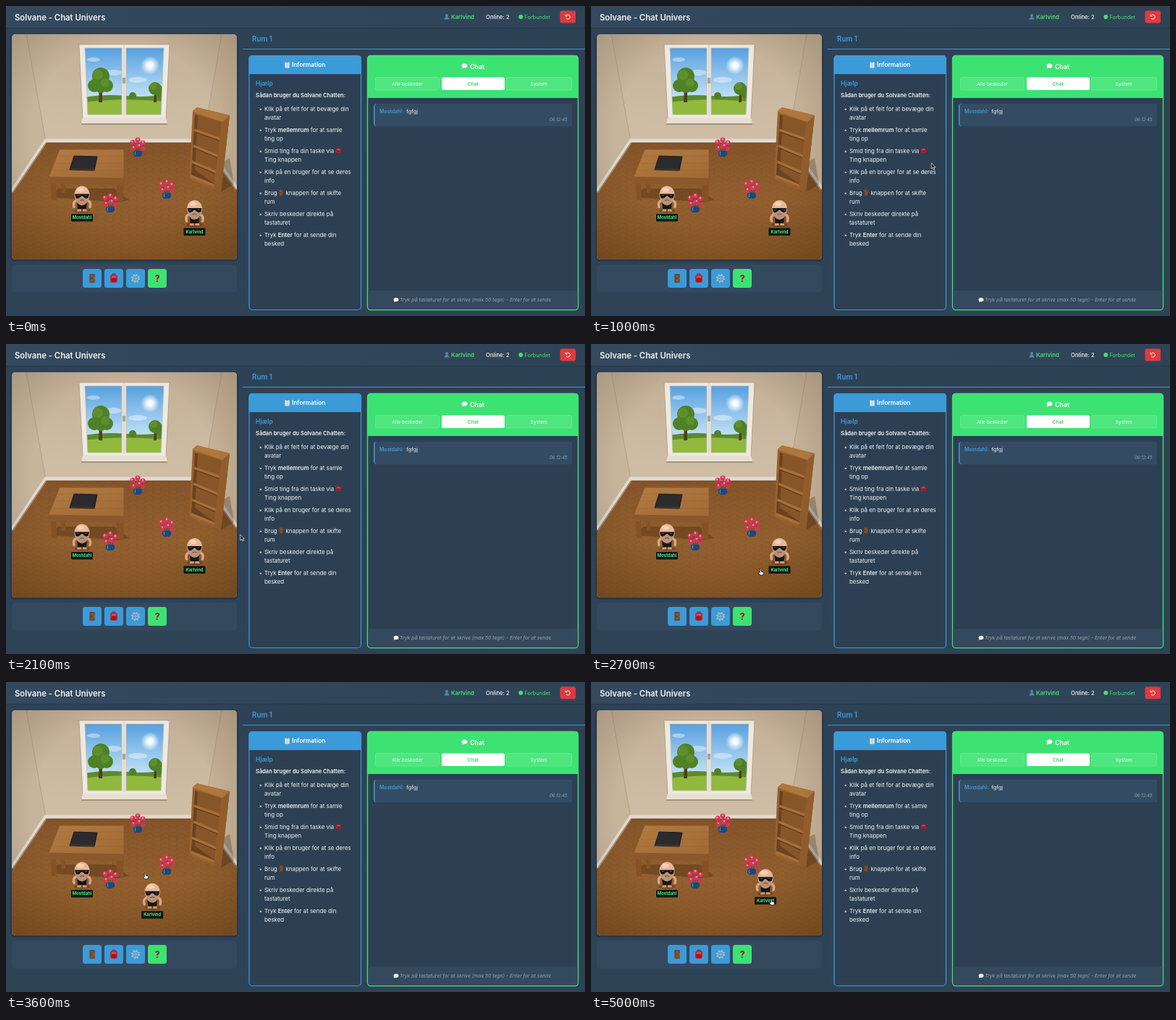
Write an HTML page that moves like this. It is 800x428 px and loops after 5100 ms.

```html
<!DOCTYPE html>
<html lang="da">
<head>
<meta charset="utf-8">
<title>Chat Univers</title>
<style>
html, body { margin: 0; width: 100%; height: 100%; overflow: hidden; background: #2f4255; }
svg { display: block; font-family: Inter, "Open Sans", sans-serif; }
.b { font-weight: 600; }
.mid { text-anchor: middle; }
.help { font-size: 7.9px; fill: #f0f3f5; }
.tab { font-size: 6.6px; fill: #f4fff7; text-anchor: middle; }
.tag { font-size: 5.8px; font-weight: 700; fill: #4be878; text-anchor: middle; }
</style>
</head>
<body>
<svg width="800" height="428" viewBox="0 0 800 428">
<defs>
  <linearGradient id="page" x2="0" y2="1"><stop stop-color="#2e4155"/><stop offset="1" stop-color="#2f4357"/></linearGradient>
  <linearGradient id="bar"><stop stop-color="#34495e"/><stop offset="1" stop-color="#2f4357"/></linearGradient>
  <linearGradient id="wall" x2="0" y2="1"><stop stop-color="#c4b097"/><stop offset="1" stop-color="#dccdb8"/></linearGradient>
  <linearGradient id="floor" x2="0" y2="1"><stop stop-color="#85542a"/><stop offset=".5" stop-color="#92602f"/><stop offset="1" stop-color="#8a5827"/></linearGradient>
  <linearGradient id="sky" x2="0" y2="1"><stop stop-color="#559fdf"/><stop offset=".65" stop-color="#b4d9f3"/><stop offset="1" stop-color="#e2f0f2"/></linearGradient>
  <linearGradient id="wood" x2="1" y2="1"><stop stop-color="#b27b43"/><stop offset="1" stop-color="#a06a35"/></linearGradient>
  <radialGradient id="sun"><stop stop-color="#fff"/><stop offset=".3" stop-color="#fff" stop-opacity=".9"/><stop offset="1" stop-color="#fff" stop-opacity="0"/></radialGradient>
  <radialGradient id="shade" cy=".45" r=".75"><stop offset=".55" stop-color="#201004" stop-opacity="0"/><stop offset="1" stop-color="#201004" stop-opacity=".22"/></radialGradient>
  <pattern id="parquet" width="22" height="13" patternUnits="userSpaceOnUse">
    <path d="M0 0L11 7L22 0M0 6.5L11 13.5L22 6.5M5 3V10M16 3V10" fill="none" stroke="#4d2c0c" stroke-width=".6" opacity=".2"/>
  </pattern>
  <clipPath id="roomClip"><rect x="8" y="39" width="311" height="311" rx="5"/></clipPath>
  <clipPath id="panes"><path d="M109 58H160V150H113ZM166 58H218L214 150H166Z"/></clipPath>

  <g id="flower">
    <path d="M0 8L-7-5M0 8L1-9M0 8L8-4" stroke="#26603a" stroke-width="1.3"/>
    <g fill="#dd3158"><circle cx="-7" cy="-7" r="3.5"/><circle cx="0" cy="-10" r="3.6"/><circle cx="7" cy="-6" r="3.6"/><circle cx="-6" cy="1" r="3.4"/><circle cx="1" cy="-2" r="3.5"/><circle cx="7" cy="2" r="3"/></g>
    <g fill="#f88ca2"><circle cx="-8" cy="-8" r="1.4"/><circle cx="0" cy="-11" r="1.4"/><circle cx="7" cy="-7" r="1.4"/><circle cx="-6" cy="0" r="1.2"/><circle cx="2" cy="-3" r="1.3"/></g>
    <path d="M-5 5H5Q8 11 3 13H-3Q-8 11-5 5Z" fill="#1c4683"/><path d="M-3 6Q-5 9-3 11" stroke="#5d9ad8" fill="none"/>
  </g>
  <g id="avatar">
    <ellipse cy="16" rx="11" ry="3" fill="#2a1706" opacity=".3"/>
    <path d="M-5 10H-1V17H-7ZM1 10H5L7 17H1Z" fill="#d69d7d"/>
    <path d="M-8 2Q-13 4-11 11M8 2Q13 4 11 11" fill="none" stroke="#dca584" stroke-width="3.5" stroke-linecap="round"/>
    <path d="M-7 2H7L6 14H-6Z" fill="#17171a"/>
    <ellipse cy="-6" rx="10.5" ry="12" fill="#e9b899"/>
    <path d="M-9-2Q0-5 9-2Q8 8 0 9Q-8 8-9-2Z" fill="#b99378"/>
    <ellipse cx="-2" cy="-13" rx="5" ry="3" fill="#f6d0b5"/>
    <path d="M-3 2Q0 0 3 2" stroke="#6d3f30" fill="none"/>
    <path d="M-10-7H10L9-2Q5 1 1-4H-1Q-5 1-9-2Z" fill="#151519"/>
    <path d="M-7-5H-4M4-5H7" stroke="#68707a" stroke-width=".7"/>
    <rect x="-15" y="20.5" width="30" height="10.5" rx="1" fill="#10181a"/>
  </g>
  <g id="door"><rect x="-3.6" y="-6" width="7.2" height="12" rx=".6" fill="#75401f"/><path d="M-2.2-4.5H2.2V-1H-2.2ZM-2.2 1H2.2V4.6H-2.2Z" fill="#8d5229"/><circle cx="2.6" r=".6" fill="#e5b84b"/></g>
  <g id="bag"><path d="M-2-4V-6H2V-4" fill="none" stroke="#8f1720"/><rect x="-5" y="-5" width="10" height="11" rx="3" fill="#cf2230"/><rect x="-3.5" y="0" width="7" height="5" rx="1" fill="#9b1722"/><path d="M-3-2H3" stroke="#f27078"/></g>
  <g id="bubble"><ellipse rx="4" ry="3.1" fill="#f4f8f8"/><path d="M-3 1L-3.5 4L0 2Z" fill="#f4f8f8"/></g>
</defs>

<rect width="800" height="428" fill="url(#page)"/>
<rect width="800" height="30" fill="url(#bar)"/><rect y="30" width="800" height="1" fill="#26384a"/>
<text x="12" y="19.5" font-size="11.3" class="b" fill="#f0f3f5">Solvane - Chat Univers</text>
<path d="M605.5 18.5Q606 15 609 15T612.5 18.5Z" fill="#568aa8"/><circle cx="609" cy="13" r="2" fill="#568aa8"/>
<text x="615" y="17.8" font-size="7.9" class="b" fill="#43df72">Karlvind</text>
<text x="663" y="17.8" font-size="7.7" font-weight="500" fill="#f0f3f5">Online: 2</text>
<circle cx="711.3" cy="15" r="3" fill="#43df72"/>
<text x="716.5" y="17.8" font-size="7.3" fill="#43df72">Forbundet</text>
<rect x="765.5" y="6.5" width="21.5" height="17" rx="2.5" fill="#de3b40"/>
<path d="M774 13.2A3 3 0 1 1 774 17M773 11.7V14H775.5" fill="none" stroke="#fff" stroke-width=".9"/>

<rect x="6" y="39" width="315" height="314" rx="6" fill="#172431" opacity=".3"/>
<g clip-path="url(#roomClip)">
  <rect x="8" y="39" width="311" height="311" fill="url(#wall)"/>
  <path d="M8 39H28L55 187L8 262Z" fill="#c6b49b"/><path d="M319 39H298L272 187L319 256Z" fill="#c4b095"/>
  <path d="M28 39L55 187M298 39L272 187" stroke="#a8957b" stroke-width=".7"/>
  <path d="M8 259L55 189H272L319 256V350H8Z" fill="url(#floor)"/>
  <path d="M8 259L55 189H272L319 256V350H8Z" fill="url(#parquet)"/>
  <path d="M8 256L55 186H272L319 252" fill="none" stroke="#e2dacd" stroke-width="5"/>
  <path d="M8 259L55 189H272L319 255" fill="none" stroke="#55351a" stroke-width=".7"/>
  <path d="M101 53H226L221 156H106Z" fill="#eeeae1" stroke="#a9987f" stroke-width=".8"/>
  <g clip-path="url(#panes)">
    <rect x="108" y="57" width="111" height="94" fill="url(#sky)"/>
    <g fill="#fff" opacity=".4"><ellipse cx="121" cy="74" rx="9" ry="3"/><ellipse cx="148" cy="92" rx="12" ry="4"/><ellipse cx="182" cy="102" rx="13" ry="4"/></g>
    <circle cx="199" cy="82" r="13" fill="url(#sun)"/>
    <path d="M108 126Q135 121 166 124T220 121V151H108Z" fill="#5b8a2c"/>
    <path d="M108 133Q160 126 220 132V151H108Z" fill="#91b93e"/>
    <path d="M129 112H133V133H128ZM205 120H208V133H204Z" fill="#553e20"/>
    <g fill="#4f8126"><circle cx="131" cy="97" r="12"/><circle cx="122" cy="110" r="9"/><circle cx="139" cy="110" r="9"/><circle cx="131" cy="112" r="8"/><circle cx="206" cy="114" r="9"/><circle cx="214" cy="119" r="8"/><circle cx="175" cy="124" r="5"/></g>
    <g fill="#669630" opacity=".7"><circle cx="127" cy="95" r="7"/><circle cx="137" cy="106" r="6"/><circle cx="204" cy="111" r="5"/></g>
  </g>
  <path d="M109 58H160V150H113ZM166 58H218L214 150H166ZM163 54V152" fill="none" stroke="#c3b9a9" stroke-width=".8"/>
  <rect x="161" y="99" width="4" height="8" rx="1" fill="#aaa399"/>
  <path d="M106 154H221L223 162H104Z" fill="#e8e0d3"/><path d="M104 163H223" stroke="#97866e" stroke-width="1.5"/>

  <path d="M62 264L72 252H150L170 268L156 271Z" fill="#331b07" opacity=".3"/>
  <path d="M61 238H69L70 268H63ZM152 240H163L162 270H154ZM76 244H82V258H77Z" fill="#865224"/>
  <path d="M60 235L162 237V247L61 245Z" fill="#8a582b"/>
  <path d="M74 198H163V238L59 236Z" fill="url(#wood)" stroke="#85552a" stroke-width=".7"/>
  <path d="M72 207H162M68 217H162M64 227H162" stroke="#7c491e" stroke-width=".4" opacity=".4"/>
  <path d="M94 207L126 208L122 227L88 226Z" fill="#2b2a2c" stroke="#1b1b1e"/>
  <path d="M89 225L122 226" stroke="#5c5653" stroke-width=".6"/>

  <path d="M253 239L297 257L315 246L309 210Z" fill="#26150a" opacity=".25"/>
  <path d="M258 145L264 140L309 151L297 257L286 253L253 239Z" fill="#97622f"/>
  <path d="M261 150L299 161L290 247L256 233Z" fill="#6b4220"/>
  <path d="M265 151L299 161L290 247L261 226Z" fill="#875628"/>
  <path d="M260 171L297 184M259 193L295 208M257 215L292 230M256 235L290 249" stroke="#a8703b" stroke-width="3"/>
  <path d="M261 174L297 187M260 196L295 211M258 218L292 233" stroke="#5a3518"/>
  <path d="M298 159L309 151L297 257L287 252Z" fill="#935e2c"/>
  <path d="M258 146L264 140L309 151L299 160Z" fill="#ae773e"/>
  <rect x="8" y="39" width="311" height="311" fill="url(#shade)"/>
  <use href="#flower" x="182" y="195"/><use href="#flower" x="222" y="253"/><use href="#flower" x="144" y="272"/>
  <g transform="translate(105 266.5)"><use href="#avatar"/><text y="27.7" class="tag">Mostdahl</text></g>
  <g id="walker"><use href="#avatar"/><text y="27.7" class="tag">Karlvind</text></g>
</g>

<rect x="8" y="357" width="311" height="38.5" rx="5" fill="#34495e"/>
<g fill="#3b9bd9"><rect x="106" y="363" width="26" height="26" rx="3.5"/><rect x="136" y="363" width="26" height="26" rx="3.5"/><rect x="166" y="363" width="26" height="26" rx="3.5"/></g>
<rect x="196" y="363" width="26" height="26" rx="3.5" fill="#3de372"/>
<use href="#door" x="119" y="376"/><use href="#bag" x="149" y="376"/>
<g transform="translate(179 376)" fill="none" stroke="#aab7c1"><circle r="5" stroke-width="2.5" stroke-dasharray="1.96"/><circle r="4" stroke-width="1.3"/><circle r="1.3"/><path d="M0-4V-1M-4 0H-1M1 0H4M0 1V4" stroke-width=".7"/></g>
<text x="209" y="380.5" font-size="12.5" font-weight="800" class="mid" fill="#9c2420">?</text>

<rect x="327" y="31" width="473" height="28" fill="#2e4256"/>
<rect x="327" y="59" width="473" height="1" fill="#3b96d4"/>
<text x="340" y="48.7" font-size="9.8" class="b" fill="#3b9bdc">Rum 1</text>

<rect x="336" y="68.5" width="154.5" height="351" rx="4.5" fill="#2d4053" stroke="#3b9bd9" stroke-width="1.2"/>
<path d="M335.5 94V73Q335.5 68 340.5 68H486Q491 68 491 73V94Z" fill="#3b9bd9"/>
<rect x="385.500" y="77.5" width="6" height="8" rx=".7" fill="#edf0ed"/><path d="M387 80H390M387 82H390M387 84H390" stroke="#8299a7" stroke-width=".6"/><rect x="387" y="76.7" width="3" height="1.6" fill="#a57b52"/>
<text x="395" y="84.3" font-size="8.3" class="b" fill="#fff">Information</text>
<text x="345" y="110" font-size="8.5" class="b" fill="#3b9bdc">Hjælp</text>
<text x="345" y="125.6" font-size="7.5" class="b" fill="#f0f3f5">Sådan bruger du Solvane Chatten:</text>
<g id="help" class="help"></g>
<use href="#bag" transform="translate(459.5 199.5) scale(.6)"/>
<use href="#door" transform="translate(380 257.5) scale(.7)"/>

<rect x="499.5" y="68.5" width="291" height="351" rx="4.5" fill="#2d4053" stroke="#3de372" stroke-width="1.4"/>
<path d="M499 127V73Q499 68 504 68H786Q791 68 791 73V127Z" fill="#3de372"/>
<use href="#bubble" x="633.5" y="82.5"/>
<text x="641" y="86.5" font-size="8.9" class="b" fill="#fff">Chat</text>
<g fill="#fff" fill-opacity=".09" stroke="#fff" stroke-opacity=".28" stroke-width=".6"><rect x="510.5" y="98.5" width="88" height="17.5" rx="2"/><rect x="691.5" y="98.5" width="90" height="17.5" rx="2"/></g>
<rect x="602" y="98.5" width="87" height="17.5" rx="2" fill="#fff"/>
<text x="554.5" y="109.7" class="tab">Alle beskeder</text>
<text x="645.3" y="109.7" class="tab b" style="fill:#35cf67">Chat</text>
<text x="736.3" y="109.7" class="tab">System</text>
<rect x="508" y="135" width="274" height="31" rx="4" fill="#3b9bd9"/>
<rect x="509.5" y="135" width="272.5" height="31" rx="3.5" fill="#344c63"/>
<text x="516" y="148.3" font-size="6.9" class="b" fill="#3b9bdc">Mostdahl:</text>
<text x="553.3" y="148.3" font-size="7.3" fill="#f0f3f5">fgfgj</text>
<text x="775.5" y="158.5" font-size="6" font-style="italic" text-anchor="end" fill="#93a1ab">06:12:45</text>
<path d="M500.2 393H789.8V415Q789.8 419 786 419H504Q500.2 419 500.2 415Z" fill="#34495e"/>
<use href="#bubble" transform="translate(539 405.5) scale(.85)"/>
<text x="544" y="408.3" font-size="6.8" font-style="italic" fill="#98a5ad">Tryk på tastaturet for at skrive (max 50 tegn) - Enter for at sende</text>

<g id="cursor">
  <path id="arrow" d="M0-4V4L1.9 2.3L3.2 5L4.5 4.4L3.2 1.8H5.5Z" transform="translate(-1 0)" fill="#111" stroke="#fff" stroke-width=".7"/>
  <path id="hand" d="M-2-4Q-.5-5 0-3.5V-1L3 0Q4 .5 3.5 2L2.5 4H-1.5L-3.5 1Q-3-.5-1.5 .5Z" fill="#fff" stroke="#111" stroke-width=".8"/>
</g>
</svg>
<script>
const byId = id => document.getElementById(id);

// Every entry is one bullet: its first line and the wrapped rest.
const helpItems = [
  ['Klik på et felt for at bevæge din', 'avatar'],
  ['Tryk <tspan class="b">mellemrum</tspan> for at samle', 'ting op'],
  ['Smid ting fra din taske via', 'Ting knappen'],
  ['Klik på en bruger for at se deres', 'info'],
  ['Brug <tspan x="386.5">knappen for at skifte</tspan>', 'rum'],
  ['Skriv beskeder direkte på', 'tastaturet'],
  ['Tryk <tspan class="b">Enter</tspan> for at sende din', 'besked']
];
byId('help').innerHTML = helpItems.map(([first, rest], i) => {
  const y = 144.7 + i * 29;
  return `<text x="349.5" y="${y}">•</text><text x="357" y="${y}">${first}</text>` +
    `<text x="357" y="${y + 12.6}">${rest}</text>`;
}).join('');

// The avatar jumps tile by tile on an isometric grid, diagonally first.
const stepTime = 140;
const walks = [
  { start: 2960, cols: -1, rows: 2 },
  { start: 3700, cols: -5, rows: -4 },
  { start: 4400, cols: 6, rows: 2 }
];

function walkerAt(t) {
  let col = 0, row = 0;
  for (const { start, cols, rows } of walks) {
    const steps = t < start ? 0 : Math.floor((t - start) / stepTime) + 1;
    col += Math.sign(cols) * Math.min(steps, Math.abs(cols));
    row += Math.sign(rows) * Math.min(steps, Math.abs(rows));
  }
  return [260.5 + (col - row) * 19.45, 286 + (col + row) * 9.75];
}

// Mouse stops as [time, x, y].
const mouse = [[300, 560, 228], [600, 512, 222], [1500, 415, 219], [2700, 235, 315],
  [2930, 206, 312], [3200, 206, 312], [3600, 193, 268], [3680, 184, 224],
  [3850, 184, 222], [4300, 251, 299], [5000, 250, 304]];

function mouseAt(t) {
  const next = mouse.findIndex(stop => stop[0] > t);
  if (next < 1) return mouse.at(next).slice(1);
  const [t0, x0, y0] = mouse[next - 1], [t1, x1, y1] = mouse[next];
  const u = (t - t0) / (t1 - t0), ease = u * u * (3 - 2 * u);
  return [x0 + (x1 - x0) * ease, y0 + (y1 - y0) * ease];
}

const place = (id, [x, y]) => byId(id).setAttribute('transform', `translate(${x} ${y})`);
const show = (id, on) => byId(id).style.display = on ? '' : 'none';

function draw() {
  const t = performance.now() % 5100;
  const point = mouseAt(t);
  const overRoom = point[0] < 319;
  place('walker', walkerAt(t));
  place('cursor', point);
  show('cursor', t >= 300);
  show('hand', overRoom);
  show('arrow', !overRoom);
  requestAnimationFrame(draw);
}
draw();
</script>
</body>
</html>
```
